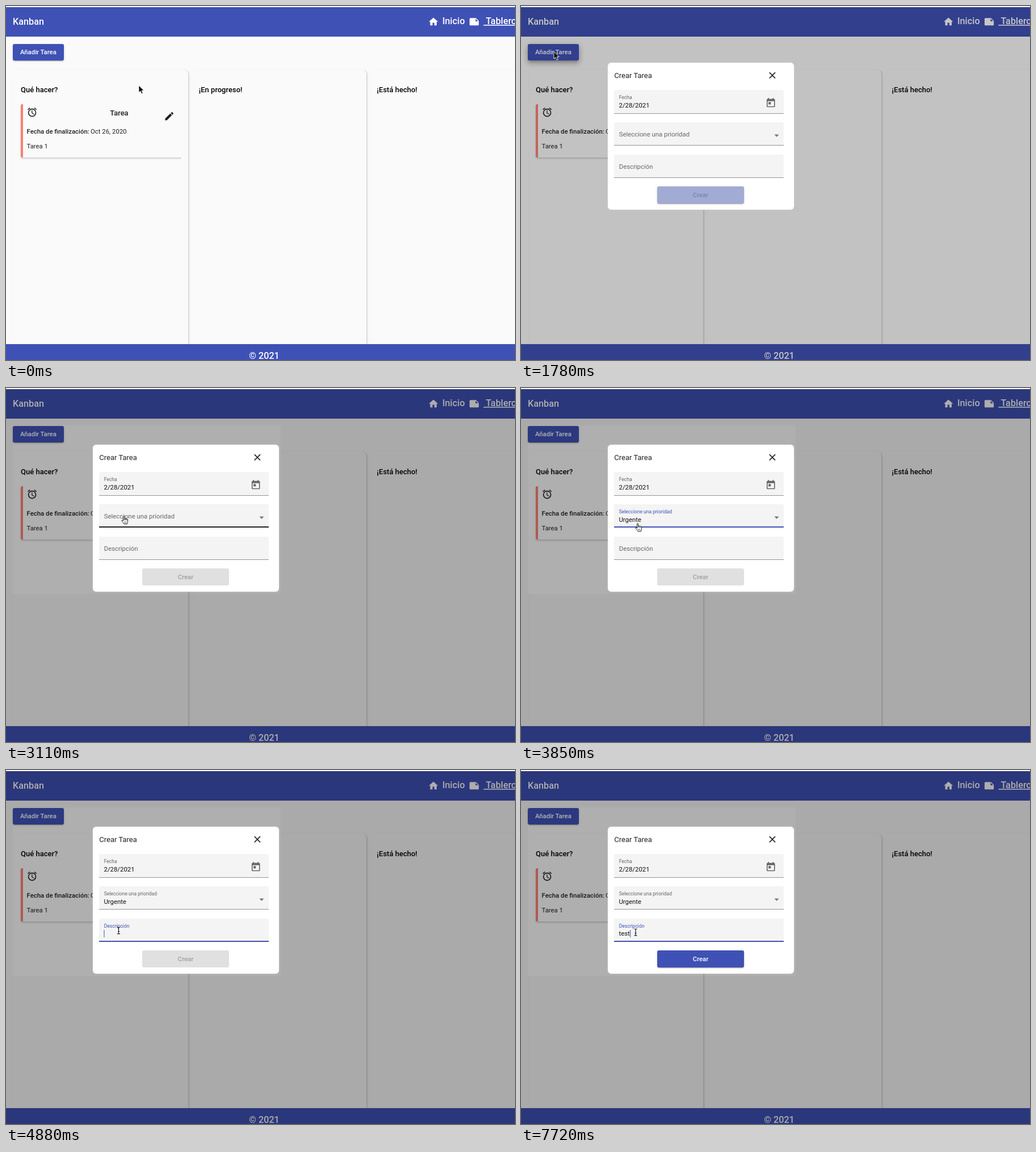
An HTML page for the animation above (8000 ms loop, 897x624 px).

```html
<!DOCTYPE html>
<html lang="es">
<head>
<meta charset="utf-8">
<title>Kanban</title>
<style>
  html, body { margin: 0; width: 100%; height: 100%; overflow: hidden; background: #fafafa; }
  #stage { position: relative; width: 897px; height: 624px; overflow: hidden; background: #fafafa; }
  #stage div, #stage svg { position: absolute; box-sizing: border-box; }
  svg { left: 0; top: 0; width: 897px; height: 624px; overflow: hidden; }
  text { font-family: Roboto, sans-serif; font-size: 11.375px; white-space: pre; }
  .layer { left: 0; top: 0; width: 897px; height: 624px; }
  .bar { left: 0; width: 897px; background: #3f51b5; }
  .column { top: 112px; width: 306.5px; height: 520px; border-radius: 8px; background: #fafafa;
    box-shadow: 1.5px 1px 3px rgba(0,0,0,.18); }
  .cardclip { left: 22px; top: 168px; width: 287px; height: 108px; overflow: hidden; }
  .card { left: 4px; top: 4.5px; width: 284px; height: 94.5px; border-left: 4px solid #fa8072;
    border-radius: 3px; box-shadow: 0 2px 3px rgba(0,0,0,.18); }
  .btn { border-radius: 3px; background: #3f51b5; overflow: hidden;
    box-shadow: 0 2px 1px -1px rgba(0,0,0,.2), 0 1px 2px rgba(0,0,0,.14), 0 1px 4px rgba(0,0,0,.12); }
  .btn.up { box-shadow: 0 4px 4px -2px rgba(0,0,0,.2), 0 6px 8px 1px rgba(0,0,0,.14), 0 2px 11px 2px rgba(0,0,0,.12); }
  .btn.off { background: #e0e0e0; box-shadow: none; }
  .btn.fading { background: #a2abd4; }
  #ripple { border-radius: 50%; background: rgba(255,255,255,.12); }
  .box { left: 153px; top: 100px; width: 327.5px; height: 258.5px; border-radius: 6px; background: #fff;
    box-shadow: 0 0 3px rgba(255,255,255,.3); }
  .field { left: 164px; width: 299px; height: 41.5px; border-radius: 3px 3px 0 0; background: #f4f4f4;
    border-bottom: 1px solid #949494; }
  .field.hover { border-bottom: 2px solid #212121; }
  .field.focus { border-bottom: 2px solid #3f51b5; }
  #panel { left: 159px; top: 206px; width: 304px; height: 78px; background: #fff; border-radius: 3px;
    box-shadow: 0 2px 3px rgba(0,0,0,.25); transform-origin: 50% 25%; }
  #option { left: 0; top: 0; width: 304px; height: 39px; background: rgba(0,0,0,.05); }
</style>
</head>
<body>
<div id="stage">
  <div class="layer" id="page">
    <div class="bar" style="top:1.5px;height:52px"></div>
    <div class="column" style="left:14px"></div>
    <div class="column" style="left:328px"></div>
    <div class="column" style="left:641.5px"></div>
    <div class="cardclip"><div class="card"></div></div>
    <div class="btn" id="add" style="left:12px;top:66.5px;width:90px;height:29px"><div id="ripple"></div></div>
    <div class="bar" style="top:596px;height:28px"></div>
    <svg id="pageInk"></svg>
  </div>
  <div class="layer" id="shade"></div>
  <div class="layer" id="shadeNear"></div>
  <div class="layer" id="dialog">
    <div class="box"></div>
    <div class="field" id="date" style="top:148px"></div>
    <div class="field" id="priority" style="top:204.7px"></div>
    <div class="field" id="desc" style="top:261.5px"></div>
    <div class="btn" id="create" style="left:240px;top:318px;width:153px;height:29.5px"></div>
    <svg id="formInk"></svg>
    <div id="panel"><div id="option"></div><svg id="panelInk"></svg></div>
  </div>
  <svg id="pointer"></svg>
</div>
<script>
const $ = id => document.getElementById(id);
const LOOP = 8000, BLUE = '#3f51b5', GREY = '#666', INK = '#212121';

function add(parent, tag, attrs, content) {
  const el = document.createElementNS('http://www.w3.org/2000/svg', tag);
  for (const k in attrs) el.setAttribute(k, attrs[k]);
  if (content) el.textContent = content;
  return parent.appendChild(el);
}
const label = (parent, x, y, str, fill = INK, size = 11.375, weight = 400, more = {}) =>
  add(parent, 'text', { x, y, fill, style: `font-size:${size}px;font-weight:${weight}`, ...more }, str);
// Icons use a 24-unit grid drawn at 19.5px.
const icon = (parent, x, y, fill, d) =>
  add(parent, 'path', { d, fill, transform: `translate(${x} ${y}) scale(.8125)` });

const page = $('pageInk'), form = $('formInk');
label(page, 12, 33.4, 'Kanban', '#fff', 16.25, 500);
label(page, 769, 32, 'Inicio', '#fff', 16.25, 500);
label(page, 841.5, 32, '\u00a0Tablero', '#fff', 16.25, 500, { 'text-decoration': 'underline' });
label(page, 455, 622.3, '© 2021', '#fff', 16.25, 500, { 'text-anchor': 'middle' });
label(page, 25, 85, 'Añadir Tarea', '#fff', 11.375, 500);
['Qué hacer?', '¡En progreso!', '¡Está hecho!'].forEach((s, i) =>
  label(page, 26 + i * 313.8, 152, s, '#000', 13, 500));
label(page, 199.5, 192.5, 'Tarea', INK, 13, 500, { 'text-anchor': 'middle' });
label(page, 36.5, 225, 'Fecha de finalización:', INK, 11.375, 500);
label(page, 149, 225, 'Oct 26, 2020');
label(page, 36.5, 251, 'Tarea 1');
icon(page, 743.5, 18, '#fff', 'M10 20v-6h4v6h5v-8h3L12 3 2 12h3v8z');
icon(page, 815.3, 18, '#fff', 'M22 10l-6-6H4c-1.1 0-2 .9-2 2v12c0 1.1.9 2 2 2h16c1.1 0 2-.9 2-2v-8zM15 5.5l5.5 5.5H15z');
icon(page, 36.3, 177.5, INK, 'M22 5.7l-4.6-3.8-1.3 1.5 4.6 3.8zM7.9 3.4L6.6 1.9 2 5.7l1.3 1.5zM12.5 8H11v6l4.8 2.9.7-1.3-4-2.4zM12 4a9 9 0 1 0 0 18a9 9 0 1 0 0-18zm0 16a7 7 0 1 1 0-14a7 7 0 1 1 0 14z');
icon(page, 278, 184.5, INK, 'M3 17.25V21h3.75L17.8 9.94l-3.75-3.75zM20.7 7.04c.4-.4.4-1 0-1.4l-2.3-2.35c-.4-.4-1-.4-1.4 0l-1.9 1.83 3.75 3.75z');

label(form, 164.3, 127, 'Crear Tarea', INK, 13);
label(form, 172.7, 164, 'Fecha', GREY, 8.53);
label(form, 172.5, 179, '2/28/2021', '#111');
icon(form, 433.2, 112.5, INK, 'M19 6.4L17.6 5 12 10.6 6.4 5 5 6.4l5.6 5.6L5 17.6 6.4 19l5.6-5.6 5.6 5.6 1.4-1.4-5.6-5.6z');
icon(form, 430.5, 161.2, '#666', 'M19 3h-1V1h-2v2H8V1H6v2H5c-1.1 0-2 .9-2 2v14c0 1.1.9 2 2 2h14c1.1 0 2-.9 2-2V5c0-1.1-.9-2-2-2zm0 16H5V8h14zM7 10h5v5H7z');
add(form, 'path', { d: 'M446.4 226.6h8.2l-4.1 4.1z', fill: '#757575' });
const prioLabel = label(form, 172.7, 230, 'Seleccione una prioridad', GREY);
const prioValue = label(form, 172.5, 235.5, 'Urgente', '#111');
const descLabel = label(form, 172.7, 286.7, 'Descripción', GREY);
const descValue = label(form, 172.5, 292, '', '#111');
const caret = add(form, 'rect', { y: 282, width: 1, height: 13, fill: BLUE });
const createText = label(form, 316.5, 336.8, 'Crear', '#fff', 11.375, 500, { 'text-anchor': 'middle' });
label($('panelInk'), 13, 24, 'Urgente', INK, 13);
label($('panelInk'), 13, 63, 'Moderado', INK, 13);

const shapes = {
  arrow: add($('pointer'), 'path', { d: 'M0 0V12.6l2.9-2.7 2.1 4.8 2.2-1-2.1-4.6h4z', fill: '#000', stroke: '#fff', 'stroke-width': .9 }),
  hand: add($('pointer'), 'path', { d: 'M3.6 1.6c0-1.5 2.1-1.5 2.1 0V5.6c.3-.9 1.9-.8 2 .3.4-.9 1.9-.7 2 .4.5-.6 1.8-.3 1.8.8v3.2c0 1.9-1 2.5-1 4.2H4.8c0-1.4-2.4-3.1-3.6-5-.8-1.5.5-2.2 1.4-1.3l1 1zM5.7 5.6v2.6M7.7 6v2.2M9.7 6.4v1.9M6 10.5v2M8.4 10.5v2', fill: '#fff', stroke: '#000', 'stroke-width': .9 }),
  beam: add($('pointer'), 'path', { d: 'M-2.6-6Q0-6 0-4.4V4.4Q0 6-2.6 6M2.6-6Q0-6 0-4.4V4.4Q0 6 2.6 6M-1.5 1.5h3', fill: 'none', stroke: '#111', 'stroke-width': 1.1 })
};

// Each row: start time, then the values that hold from there on.
const pointerSteps = [
  [0, 234, 140, 'arrow'], [150, 190, 120, 'arrow'], [300, 112, 96, 'arrow'], [450, 62, 84, 'hand'],
  [740, 60, 83.5, 'hand'], [890, 57, 83, 'hand'], [1040, 55, 82.5, 'hand'], [1190, 54, 82, 'hand'],
  [1630, 58, 80.5, 'arrow'], [1930, 72, 92, 'arrow'], [2080, 112, 122, 'arrow'], [2220, 152, 150, 'arrow'],
  [2370, 182, 170, 'arrow'], [2520, 194, 182, 'arrow'], [2670, 199, 192, 'arrow'], [2820, 201, 207, 'hand'],
  [2970, 203, 219, 'hand'], [3110, 203, 225, 'hand'], [3850, 201, 238, 'hand'], [4000, 200, 252, 'arrow'],
  [4140, 199, 266, 'arrow'], [4290, 199, 277, 'arrow'], [4590, 198.5, 283, 'beam'], [6670, 201, 285, 'beam'],
  [6820, 202, 286, 'beam']
];
const shadeSteps = [[0, 0, 0], [1780, .224, .224], [1930, .29, .285], [2080, .32, .3]];
const rippleSteps = [[0, 0], [1490, 16], [1630, 35], [1780, 0]];
const typedSteps = [[0, ''], [5170, 't'], [5320, 'te'], [6370, 'tes'], [6670, 'test']];
const caretSteps = [[0, 0], [4730, 1], [5770, 0], [6220, 1], [7120, 0], [7720, 1]];
const panelSteps = [[0, 0, 1], [3260, .6, .9], [3410, 1, 1], [3550, 0, 1]];

const at = (steps, t) => steps.filter(s => s[0] <= t).pop().slice(1);
const within = (t, a, b) => t >= a && t < b;
const show = (el, on) => { el.style.visibility = on ? 'visible' : 'hidden'; };
const state = (id, focus, hover) => { $(id).className = 'field' + (focus ? ' focus' : hover ? ' hover' : ''); };
function float(el, amount, y, rise, color) {
  el.setAttribute('y', y - rise * amount);
  el.style.fontSize = 11.375 * (1 - amount / 4) + 'px';
  el.setAttribute('fill', color);
}

$('shade').style.clipPath = 'path(evenodd, "M0 2H897V624H0ZM12 66H484V363H12Z")';
$('shadeNear').style.clipPath = 'path("M12 66H484V363H12Z")';

function render(t) {
  const [x, y, kind] = at(pointerSteps, t);
  for (const k in shapes) shapes[k].style.display = k === kind ? '' : 'none';
  shapes[kind].setAttribute('transform', `translate(${x} ${y})`);

  const [far, near] = at(shadeSteps, t);
  $('shade').style.background = `rgba(0,0,0,${far})`;
  $('shadeNear').style.background = `rgba(0,0,0,${near})`;
  const [r] = at(rippleSteps, t);
  $('ripple').style.cssText = `left:${45 - r}px;top:${14.5 - r}px;width:${2 * r}px;height:${2 * r}px`;
  $('add').className = within(t, 1490, 1930) ? 'btn up' : 'btn';
  $('dialog').style.display = t >= 1780 ? '' : 'none';

  const prioFocus = within(t, 3260, 4140), descFocus = t >= 4590;
  state('date', false, within(t, 2370, 2820));
  state('priority', prioFocus, within(t, 2820, 3260));
  state('desc', descFocus, within(t, 4140, 4590));
  float(prioLabel, t >= 3260 ? 1 : 0, 230, 9.2, prioFocus ? BLUE : GREY);
  float(descLabel, t >= 4730 ? 1 : descFocus ? .6 : 0, 286.7, 9.2, descFocus ? BLUE : GREY);
  show(prioValue, t >= 3550);

  const [opacity, scale] = at(panelSteps, t);
  $('panel').style.opacity = opacity;
  $('panel').style.transform = `scaleY(${scale})`;

  const [typed] = at(typedSteps, t);
  descValue.textContent = typed;
  caret.setAttribute('x', 172.5 + (typed ? descValue.getComputedTextLength() + .4 : 0));
  caret.style.display = at(caretSteps, t)[0] ? '' : 'none';

  const fading = t < 1930, ready = t >= 5170;
  $('create').className = 'btn' + (fading ? ' fading' : ready ? '' : ' off');
  createText.setAttribute('fill', ready ? '#fff' : fading ? '#7c84ac' : '#a0a0a0');
}

const start = performance.now();
function tick() {
  render((performance.now() - start) % LOOP);
  requestAnimationFrame(tick);
}
tick();
</script>
</body>
</html>
```
